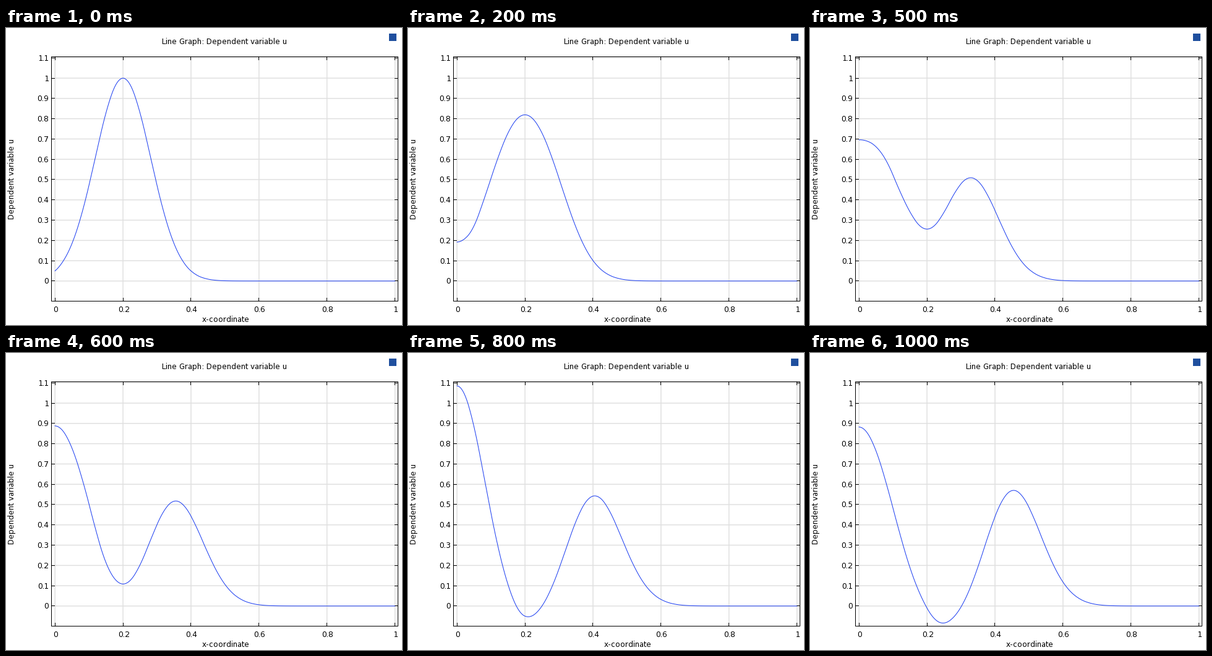
Recreate the animation shown at these times as a matplotlib script. Size 640 by 480 pixels, loop 1.1 s.

```python
import numpy as np
import matplotlib.pyplot as plt
from matplotlib.animation import FuncAnimation
from matplotlib.patches import Rectangle

W, H, DPI = 640, 480, 100
PX = 72 / DPI                       # one pixel in points
FRAMES, INTERVAL = 11, 100
LEFT, RIGHT, TOP, BOTTOM = 73.5, 633.5, 46.5, 441.5

plt.rcParams["font.family"] = "DejaVu Sans"
plt.rcParams["text.hinting_factor"] = 1     # whole-pixel letter spacing
plt.rcParams["path.simplify"] = False


def sx(x):
    return 79.2 + 549.4 * x


def sy(u):
    return 408.9 - 327.9 * u


def mid(p):
    """Centre of the pixel that holds p."""
    return np.floor(p) + 0.5


# Telegraph equation u_tt + D u_t + A u = u_xx with closed ends,
# on quadratic finite elements: one backward Euler step, then BDF2.
ELEMENTS, STEPS, FRAME_TIME = 30, 3, 0.025
D, A = -2.0, 1.0


def assemble():
    n, h = 2 * ELEMENTS + 1, 1 / ELEMENTS
    mass, stiff = np.zeros((n, n)), np.zeros((n, n))
    me = h / 30 * np.array([[4, 2, -1], [2, 16, 2], [-1, 2, 4]])
    ke = 1 / (3 * h) * np.array([[7, -8, 1], [-8, 16, -8], [1, -8, 7]])
    for e in range(ELEMENTS):
        part = slice(2 * e, 2 * e + 3)
        mass[part, part] += me
        stiff[part, part] += ke
    return mass, stiff


def solve():
    mass, stiff = assemble()
    force = A * mass + stiff
    dt = FRAME_TIME / STEPS

    def implicit(ub, vb, s):
        lhs = mass * (1 + s * D) + s * s * force
        v = np.linalg.solve(lhs, mass @ vb - s * force @ ub)
        return ub + s * v, v

    x = np.linspace(0, 1, 2 * ELEMENTS + 1)
    u = np.exp(-3 * (x / 0.2 - 1) ** 2)
    v = np.zeros_like(u)
    states = [(u, v), implicit(u, v, dt)]
    while len(states) <= STEPS * (FRAMES - 1):
        (u0, v0), (u1, v1) = states[-2:]
        states.append(implicit((4 * u1 - u0) / 3, (4 * v1 - v0) / 3, 2 * dt / 3))
    return [s[0] for s in states[::STEPS]]


def smooth(u, parts=8):
    """Evaluate the quadratic elements at evenly spaced points."""
    r = np.arange(parts) / parts
    a, b, c = u[:-2:2, None], u[1::2, None], u[2::2, None]
    vals = a * (1 - r) * (1 - 2 * r) + 4 * b * r * (1 - r) + c * r * (2 * r - 1)
    return np.append(vals.ravel(), u[-1])


fig = plt.figure(figsize=(W / DPI, H / DPI), dpi=DPI, facecolor="white")
ax = fig.add_axes([0, 0, 1, 1])
ax.set(xlim=(0, W), ylim=(H, 0))
ax.axis("off")


def line(x, y, color="black", width=1, **kw):
    return ax.plot(x, y, color=color, lw=width * PX, snap=False, **kw)[0]


def tick(x, y):
    line(x, y, zorder=3, solid_capstyle="butt")


def label(x, y, s, ha="center", **kw):
    ax.text(x, y, s, ha=ha, va="baseline", fontsize=12 * PX, color="black", **kw)


xticks = np.arange(6) / 5
yticks = np.arange(12) / 10

for t in xticks:
    line([sx(t)] * 2, [TOP, BOTTOM], "#e0e0e0", 1.5)
for t in yticks:
    line([LEFT, RIGHT], [sy(t)] * 2, "#e0e0e0", 1.5)

for t in xticks:
    x = mid(sx(t))
    tick([x, x], [TOP, TOP + 5.5])
    tick([x, x], [BOTTOM - 5.5, BOTTOM])
    label(x + 0.7, 459, f"{t:g}")
for t in yticks:
    y = mid(sy(t))
    tick([LEFT, LEFT + 5.5], [y, y])
    tick([RIGHT - 5.5, RIGHT], [y, y])
    label(69.6, y + 4.5, f"{t:g}", ha="right")

ax.add_patch(Rectangle((LEFT, TOP), RIGHT - LEFT, BOTTOM - TOP, fill=False,
                       ec="black", lw=PX, snap=False, zorder=3))

label(353.2, 26, "Line Graph: Dependent variable u")
label(354.7, 475, "x-coordinate")
label(13, 244, "Dependent variable u", rotation=90, rotation_mode="anchor")

ax.add_patch(Rectangle((619, 9), 12, 12, fc="#1f4f9e", ec="none"))

curves = [sy(smooth(u)) for u in solve()]
curve = line(sx(np.linspace(0, 1, len(curves[0]))), curves[0], "#1a3cf0", 1, zorder=4)


def update(i):
    curve.set_ydata(curves[i])
    return [curve]


anim = FuncAnimation(fig, update, frames=FRAMES, interval=INTERVAL,
                     repeat=True, repeat_delay=0, blit=False)
plt.show()
```
